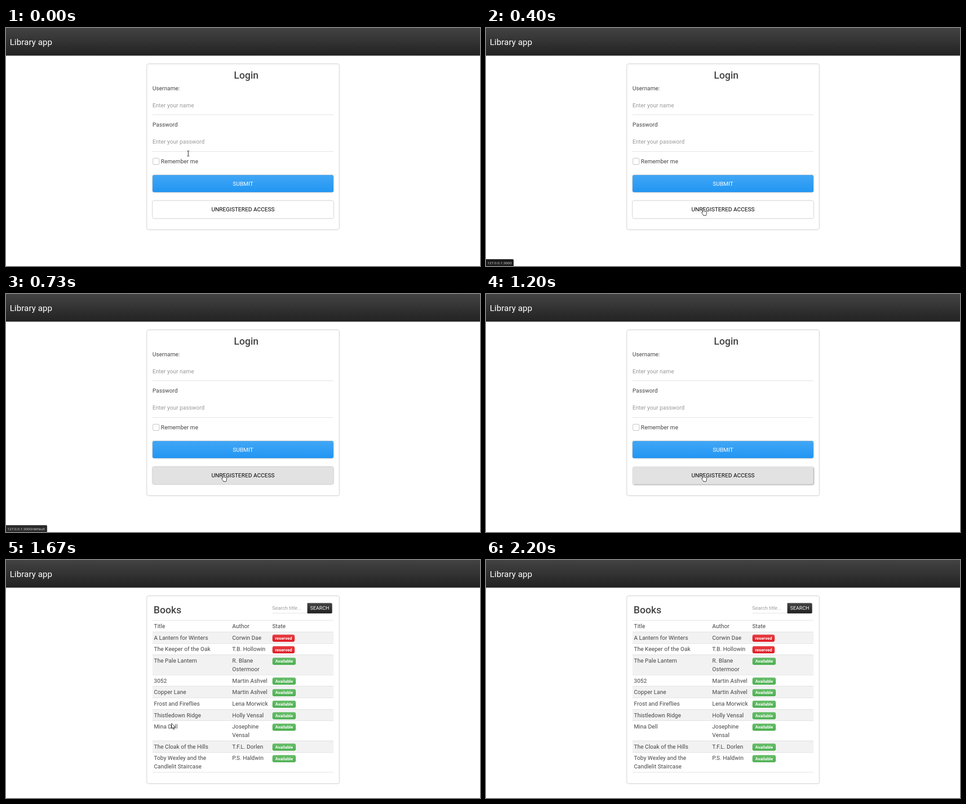
Write an HTML page that moves like this. It is 1055 by 531 pixels and loops after 3.27 s.

```html
<!DOCTYPE html>
<html lang="en">
<head>
<meta charset="utf-8">
<title>Library app</title>
<style>
html, body { margin: 0; width: 100%; height: 100%; overflow: hidden; background: #fff; }
svg { display: block; }
text { font: 12.6px Roboto, sans-serif; letter-spacing: .08px; fill: #444; white-space: pre; }
.mid { text-anchor: middle; }
.brand { font-size: 18.9px; letter-spacing: .1px; fill: #fff; }
.heading { font-size: 22px; font-weight: 500; letter-spacing: 0; }
.hint { fill: #999; }
.small { font-size: 11.03px; }
.white { fill: #fff; }
.badge { font-size: 9.45px; font-weight: 700; fill: #fff; }
.line { fill: #ddd; }
.bar { filter: drop-shadow(0 .8px 1px rgba(0,0,0,.4)); }
.card { fill: #fff; filter: drop-shadow(0 .9px 1.2px rgba(0,0,0,.5)); }
.button { filter: drop-shadow(.6px .8px 1.2px rgba(0,0,0,.45)); }
.pressed { filter: drop-shadow(1.4px 1.5px 1.4px rgba(0,0,0,.45)); }
#status text { font: 8px "Open Sans", "Noto Sans", sans-serif; letter-spacing: 0; fill: #e4e4e4; }
#cursor path { fill: #fff; stroke: #000; stroke-width: .9; stroke-linejoin: round; }
#cursor #beam { fill: none; stroke-width: 1; }
</style>
</head>
<body>
<svg width="1055" height="531" viewBox="0 0 1055 531">
  <defs id="defs"></defs>
  <rect class="bar" x="-5" width="1065" height="61.5" fill="url(#dark)"/>
  <text class="brand" x="8.5" y="38">Library app</text>

  <g id="login">
    <rect class="card" x="314" y="80.5" width="427.3" height="369" rx="4"/>
    <text class="heading mid" x="534.7" y="113">Login</text>
    <text x="326" y="139">Username:</text>
    <text class="hint" x="326" y="177">Enter your name</text>
    <rect class="line" x="326" y="193" width="403" height="1"/>
    <text x="326" y="220">Password</text>
    <text class="hint" x="326" y="258">Enter your password</text>
    <rect class="line" x="326" y="275" width="403" height="1"/>
    <rect x="327" y="290.5" width="14" height="14" rx="2" fill="#fff" stroke="#bbb"/>
    <text x="344.8" y="302">Remember me</text>
    <rect class="button" x="326.3" y="328" width="402.4" height="38.3" rx="3.5" fill="url(#blue)"/>
    <text class="white mid" x="527.5" y="352">SUBMIT</text>
    <rect id="guest" class="button" x="326.3" y="385.6" width="402.4" height="39" rx="3.5"/>
    <text class="mid" x="527.5" y="409" style="fill:#000">UNREGISTERED ACCESS</text>
  </g>

  <g id="books">
    <rect class="card" x="314" y="80.5" width="427.3" height="418" rx="4"/>
    <text class="heading" x="328.5" y="119">Books</text>
    <text class="hint small" x="592.6" y="111">Search title...</text>
    <rect class="line" x="593" y="118" width="78" height="1"/>
    <path class="button" d="M670.8 96.2h52.4q2.5 0 2.5 2.5v17.8q0 2.5-2.5 2.5h-52.4z" fill="url(#dark)"/>
    <text class="small white mid" x="698.2" y="111">SEARCH</text>
  </g>

  <g id="status">
    <path fill="#222"/>
    <text x="3" y="526.5"></text>
  </g>

  <g id="cursor">
    <path id="beam" d="M-2.5-6q2 0 2.5 1q.5-1 2.5-1M0-5V5M-2.5 6q2 0 2.5-1q.5 1 2.5 1"/>
    <path id="arrow" d="M.5.5V12.2L3.2 9.8 5 14 6.9 13.2 5.1 9.2H8.8Z"/>
    <path id="hand" d="M-1.2 9V1.6a1.2 1.2 0 0 1 2.4 0V6.2l4.5 1q1.6.4 1.5 2l-.5 4.2-1.1 3H0L-.8 14.4-4 10.4q-.3-1.7 1.4-1.4z"/>
  </g>
</svg>
<script>
const $ = id => document.getElementById(id);
const clamp = v => Math.max(0, Math.min(1, v));

const gradients = {
  dark: ['#434343', '#222'], blue: ['#42a6f5', '#2196f3'],
  red: ['#e83d43', '#e01a24'], green: ['#67bd6a', '#4caf50']
};
$('defs').innerHTML = Object.entries(gradients).map(([id, [top, bottom]]) =>
  `<linearGradient id="${id}" x2="0" y2="1"><stop stop-color="${top}"/><stop offset="1" stop-color="${bottom}"/></linearGradient>`
).join('');

// A slash marks a line break inside a cell.
const rows = [
  ['Title', 'Author'],
  ['A Lantern for Winters', 'Corwin Dae', 1],
  ['The Keeper of the Oak', 'T.B. Hollowin', 1],
  ['The Pale Lantern', 'R. Blane/Ostermoor'],
  ['3052', 'Martin Ashvel'],
  ['Copper Lane', 'Martin Ashvel'],
  ['Frost and Fireflies', 'Lena Morwick'],
  ['Thistledown Ridge', 'Holly Vensal'],
  ['Mina Dell', 'Josephine/Vensal'],
  ['The Cloak of the Hills', 'T.F.L. Dorlen'],
  ['Toby Wexley and the/Candlelit Staircase', 'P.S. Haldwin']
];

function cell(x, y, content) {
  return content.split('/').map((line, i) =>
    `<text x="${x}" y="${Math.round(y + 17.6 + i * 18.7)}">${line}</text>`).join('');
}

function badge(y, reserved) {
  const [label, width, color] = reserved ? ['reserved', 49.5, 'red'] : ['Available', 52, 'green'];
  return `<rect x="593" y="${y + 6.3}" width="${width}" height="16" rx="4" fill="url(#${color})"/>
    <text class="badge mid" x="${593 + width / 2}" y="${Math.round(y + 17.7)}">${label}</text>`;
}

const rule = y => `<rect class="line" x="326" y="${Math.floor(y + .2)}" width="403" height="1"/>`;

function table() {
  let y = 134.5, out = '';
  rows.forEach(([title, author, reserved], i) => {
    const height = (title + author).includes('/') ? 44.4 : 25.7;
    if (i % 2) out += `<rect x="326" y="${Math.floor(y + .2)}" width="403" height="${height}" fill="#f2f2f2"/>`;
    out += rule(y) + cell(329.3, y, title) + cell(503.6, y, author);
    out += i ? badge(y, reserved) : cell(592.7, y, 'State');
    y += height;
  });
  return out + rule(y);
}
$('books').insertAdjacentHTML('beforeend', table());

function drawCursor(step) {
  let x, y, kind;
  if (step < 25) {
    const p = clamp(step / 6), e = p * p * (3 - 2 * p);
    x = 405.5 + 78.5 * e;
    y = 280 + 122 * e;
    kind = y < 286 ? 'beam' : y > 385 || (y > 328 && y < 366) ? 'hand' : 'arrow';
  } else {
    const u = (step - 25) / 7;
    x = 368 - u * (400 - 93 * u);
    y = 364 - u * (110 - 265 * u);
    kind = 'arrow';
  }
  $('cursor').setAttribute('transform', `translate(${Math.round(x * 2) / 2} ${Math.round(y)})`);
  for (const id of ['beam', 'arrow', 'hand']) $(id).style.display = id === kind ? '' : 'none';
  $('cursor').style.display = step < 33 ? '' : 'none';
}

function drawStatus(step) {
  const grow = clamp((step - 8) / 3), width = 61.5 + 30 * grow;
  const [shape, label] = $('status').children;
  shape.setAttribute('d', `M0 515.7H${width - 2.5}q2.5 0 2.5 2.5V531H0z`);
  shape.setAttribute('fill', step < 9 ? '#1c1c1c' : '#2b2b2b');
  label.textContent = '127.0.0.1:3000/default'.slice(0, 14 + Math.round(8 * grow));
  $('status').style.opacity = step < 6 ? 0 : clamp((18 - step) / 3);
}

function frame() {
  // The screen refreshes fifteen times a second.
  const t = Math.floor(performance.now() % 3270 / 10) * 10;
  const step = Math.floor((t + 4) * 15 / 1000);
  const listing = step >= 19;
  $('login').style.display = listing ? 'none' : '';
  $('books').style.display = listing ? '' : 'none';
  const shade = 255 - 29 * clamp((step - 6) / 2.2);
  $('guest').setAttribute('fill', `rgb(${shade},${shade},${shade})`);
  $('guest').setAttribute('class', step < 16 ? 'button' : 'pressed');
  drawStatus(step);
  drawCursor(step);
  requestAnimationFrame(frame);
}
frame();
</script>
</body>
</html>
```
